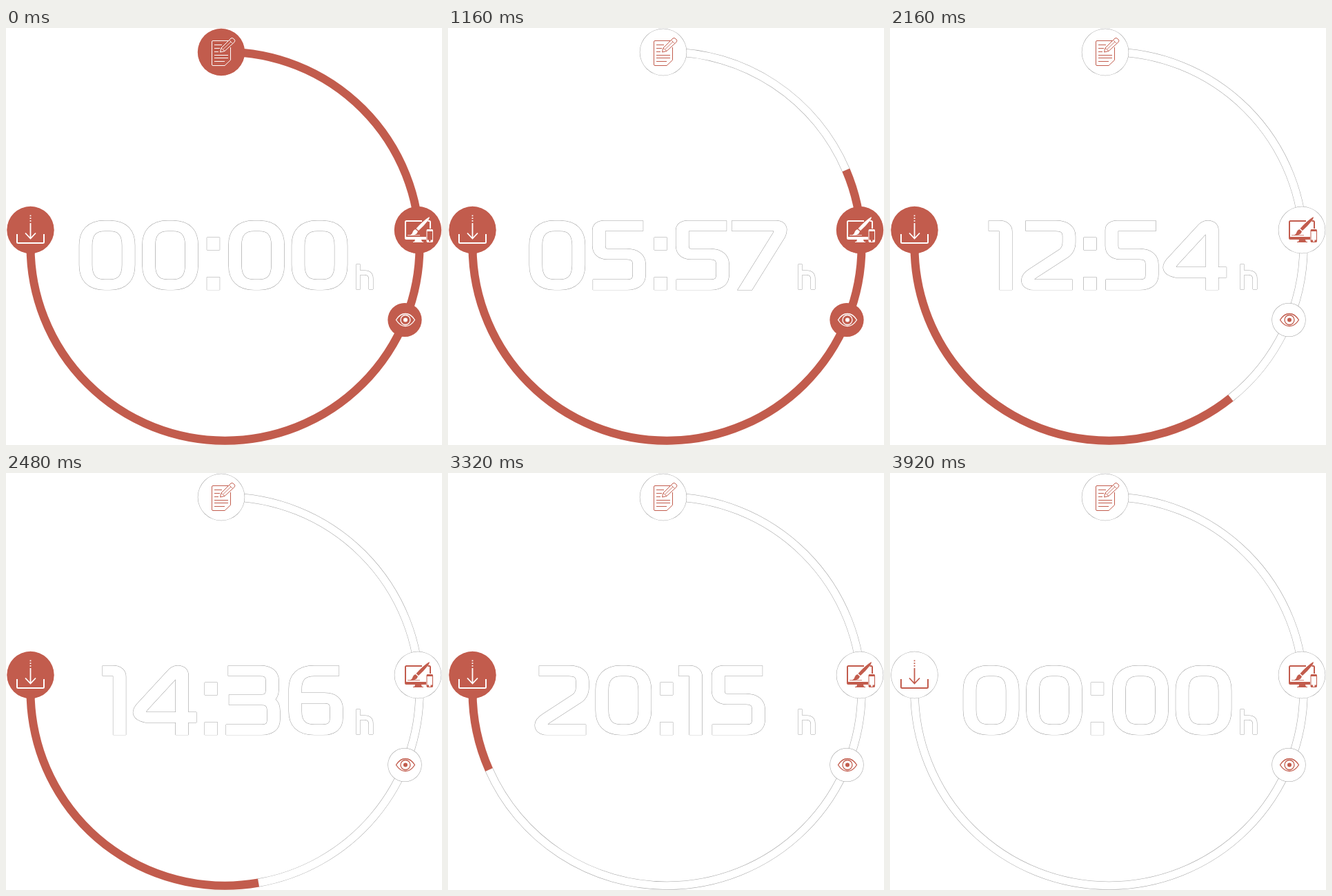
Recreate the animation shown at these times as an HTML page with a canvas. Size 632 by 605 pixels, loop 4840 ms.

```html
<!DOCTYPE html>
<html lang="en">
<head>
<meta charset="utf-8">
<title>Day clock</title>
<style>
  html, body { margin: 0; width: 100%; height: 100%; overflow: hidden; background: #fff; }
  canvas { display: block; }
</style>
</head>
<body>
<canvas id="stage" width="632" height="605"></canvas>
<script>
const ctx = document.getElementById('stage').getContext('2d');
const LOOP = 4840, STEP = 40;
const RED = [194, 92, 77], WHITE = [255, 255, 255], HAIR = [160, 160, 160];

// [time, value] keys, linear in between
const minuteKeys = [[240, 0], [720, 186.5], [1160, 357.5], [1800, 659.5], [2480, 876.5], [3320, 1215.5], [3920, 1440]];
const angleKeys = [[80, 0], [280, 7], [600, 28.8], [720, 37.2], [1160, 66.9], [1325, 78], [1655, 92],
  [1800, 106], [1840, 112.5], [2280, 152.1], [2480, 170.1], [3320, 246.2], [3560, 268], [3600, 270]];
const shiftKeys = [[80, .5], [720, 6.25], [1160, 3.5], [1800, 18.5], [2480, 16], [3320, -7.25], [3920, .5]];

// Glyph: left bearing, advance, centre line (x is stretched by STRETCH)
const STRETCH = 1.23;
const glyphs = {
  0: [5.5, 91.5, 'M7.5 36V64Q7.5 93 30 93H36Q58 93 58 64V36Q58 7.5 36 7.5H30Q7.5 7.5 7.5 36Z'],
  1: [1, 43.5, 'M0 7.5H12Q20 7.5 20 16V100.5'],
  2: [5, 87.5, 'M5 7.5H40Q56 7.5 56 23V31Q56 43 48.5 48.5L14 76Q7.5 81 7.5 86Q7.5 93 14 93H60'],
  3: [5, 89.5, 'M2.5 7.5H40Q54.5 7.5 54.5 22V34Q54.5 49.5 42 49.5H3.5M42 49.5Q56 49.5 56 66V78Q56 93 42 93H0'],
  4: [2.5, 98, 'M74 75H15Q2 72 10 60L46 12Q49 7.5 52 7.5Q57 7.5 57 14V100.5'],
  5: [5.5, 87.5, 'M59.5 7.5H14Q7.5 7.5 7.5 14V36Q7.5 48.5 18 48.5H40Q55 48.5 55 64V78Q55 93 41 93H.5'],
  6: [6.5, 89.5, 'M59 7.5H30Q7.5 7.5 7.5 34V66Q7.5 93 30 93H40Q56 93 56 76V62Q56 47 42 47H7.5'],
  7: [-1, 82, 'M0 7.5H52Q60 8 55.5 21L13 105'],
  8: [5.5, 89.5, 'M32 49.5H23Q9 49.5 9 36V21Q9 7.5 23 7.5H41Q55 7.5 55 21V36Q55 49.5 41 49.5H23' +
    'Q7.5 49.5 7.5 64V78Q7.5 93 23 93H41Q56.5 93 56.5 78V64Q56.5 49.5 41 49.5'],
  9: [6, 89, 'M4.5 93H33.5Q56 93 56 66.5V34.5Q56 7.5 33.5 7.5H23.5Q7.5 7.5 7.5 24.5V38.5Q7.5 53.5 21.5 53.5H56'],
  ':': [8, 33.5, 'M7.1 24.5V42.5M7.1 82V100.5']
};
for (const key in glyphs) glyphs[key][2] = new Path2D(glyphs[key][2]);
const hourSign = new Path2D('M510.5 343V379M510.5 355H520Q529 355 529 364V379');

const line = (width, d) => ({ width, path: new Path2D(d) });
const solid = d => ({ path: new Path2D(d) });

const icons = [
  { x: 312, y: 35, r: 34.2, from: 80, to: 280, parts: [
    line(1, 'M322 18.5H300Q298.5 18.5 298.5 20V53Q298.5 54.5 300 54.5H317L325.5 46.5V28'),
    line(1, 'M302 24.5H313M302 29.5H310M302 34.5H308M302 39.5H322M302 43.5H322M302 48.5H317'),
    line(1, 'M310.5 35L312 29L326 15Q328 13.500 330.5 16Q333 18.5 331 20.5L317 33.5Z'),
    line(.8, 'M312 29L317 33.5M323.5 17.5L328.5 22.5M314.5 31L326 20')
  ] },
  { x: 597, y: 293, r: 34.2, from: 1325, to: 1655, parts: [
    line(2, 'M603 280H580.5Q579 280 579 281.5V305M611.5 280H613.5Q615 280 615 281.5V291'),
    solid('M578 303H609V307H580Q578 307 578 305ZM593 307H602L603 310H605V311H590V310H592Z'),
    solid('M613.5 274Q614.5 275 612 279Q605 288 598 294L594.5 291Q604 280 613.5 274Z'),
    solid('M593.5 292L597 295Q596 301 585 301Q589 299 589.5 296Q590.5 293 593.5 292Z'),
    line(.8, 'M582 300.7H600'),
    line(1, 'M611 292.5H617.5Q618.5 292.5 618.5 293.5V309.5Q618.5 310.5 617.5 310.5H611Q610 310.5 610 309.5V293.5Q610 292.5 611 292.5Z'),
    solid('M610 292.5H618.5V295H610ZM610 307.5H613V310.5H610ZM615.5 307.5H618.5V310.5H615.5Z')
  ] },
  { x: 578, y: 423.5, r: 24.6, from: 1800, to: 1840, parts: [
    line(1.3, 'M565.5 423.5Q571 414.5 579 414.5Q587 414.5 592.5 423.5Q587 432.5 579 432.5Q571 432.5 565.5 423.5Z'),
    line(1.3, 'M572 423.5a7 7 0 1 0 14 0a7 7 0 1 0-14 0'),
    solid('M576 423.5a3 3 0 1 0 6 0a3 3 0 1 0-6 0')
  ] },
  { x: 35.5, y: 293, r: 34.2, from: 3560, to: 3920, parts: [
    line(2, 'M16 299V310.5Q16 312 17.5 312H53.5Q55 312 55 310.5V299'),
    line(1.8, 'M35.5 283V305M28 297.5L35.5 305.5L43 297.5'),
    line(1.8, 'M35.5 271.5V273.3M35.5 275.3V277M35.5 279V280.7')
  ] }
];

const clamp = v => Math.min(1, Math.max(0, v));
const mix = (a, b, k) => `rgb(${a.map((v, i) => Math.round(v + (b[i] - v) * k))})`;
const white = `rgb(${WHITE})`, hair = `rgb(${HAIR})`, red = `rgb(${RED})`;

function valueAt(keys, t) {
  const i = keys.findIndex(key => key[0] > t);
  if (i === 0) return keys[0][1];
  if (i < 0) return keys[keys.length - 1][1];
  const [t0, v0] = keys[i - 1], [t1, v1] = keys[i];
  return v0 + (v1 - v0) * (t - t0) / (t1 - t0);
}

// White stroke with a thin grey rim, stretched horizontally
function rimmedStroke(path, x, y, width, stretch) {
  const put = (dx, dy, colour) => {
    ctx.setTransform(stretch, 0, 0, 1, x + dx, y + dy);
    ctx.strokeStyle = colour;
    ctx.stroke(path);
  };
  ctx.lineWidth = width;
  for (const [dx, dy] of [[.5, 0], [-.5, 0], [0, .5], [0, -.5]]) put(dx, dy, hair);
  put(0, 0, white);
  ctx.setTransform(1, 0, 0, 1, 0, 0);
}

function arc(from, to, width, colour) {
  const rad = deg => (deg - 90) * Math.PI / 180;
  ctx.beginPath();
  ctx.arc(317.5, 316.7, 282, rad(from), rad(to));
  ctx.lineWidth = width;
  ctx.strokeStyle = colour;
  ctx.stroke();
}

function drawRing(angle) {
  if (angle > 0) {
    arc(0, angle, 12, hair);
    arc(0, angle, 11, white);
  }
  if (angle < 270) arc(angle, 270, 12, red);
}

function disc(x, y, r, colour) {
  ctx.beginPath();
  ctx.arc(x, y, r, 0, 2 * Math.PI);
  ctx.fillStyle = colour;
  ctx.fill();
}

function drawIcon({ x, y, r, from, to, parts }, t) {
  const k = clamp((t - from) / (to - from));
  disc(x, y, r, mix(RED, HAIR, k));
  disc(x, y, r - .5, mix(RED, WHITE, k));
  ctx.fillStyle = ctx.strokeStyle = mix(WHITE, RED, k);
  for (const { path, width } of parts) {
    if (!width) ctx.fill(path);
    else {
      ctx.lineWidth = width;
      ctx.stroke(path);
    }
  }
}

function drawTime(t) {
  const minutes = Math.floor(valueAt(minuteKeys, t)) % 1440;
  const two = n => String(n).padStart(2, '0');
  const text = [...two(Math.floor(minutes / 60)) + ':' + two(minutes % 60)].map(c => glyphs[c]);
  const total = text.reduce((sum, glyph) => sum + glyph[1], 0);
  let x = 300 - total / 2 + valueAt(shiftKeys, t);
  ctx.save();
  ctx.beginPath();
  ctx.rect(0, 278, 632, 102.5);
  ctx.clip();
  for (const [bearing, advance, path] of text) {
    rimmedStroke(path, x + bearing, 279.5, 15, STRETCH);
    x += advance;
  }
  rimmedStroke(hourSign, 0, 0, 6, 1);
  ctx.restore();
}

function draw(elapsed) {
  const t = Math.floor(elapsed % LOOP / STEP) * STEP;
  ctx.fillStyle = white;
  ctx.fillRect(0, 0, 632, 605);
  drawRing(valueAt(angleKeys, t));
  icons.forEach(icon => drawIcon(icon, t));
  drawTime(t);
}

const start = performance.now();
function tick() {
  draw(performance.now() - start);
  requestAnimationFrame(tick);
}
tick();
</script>
</body>
</html>
```
